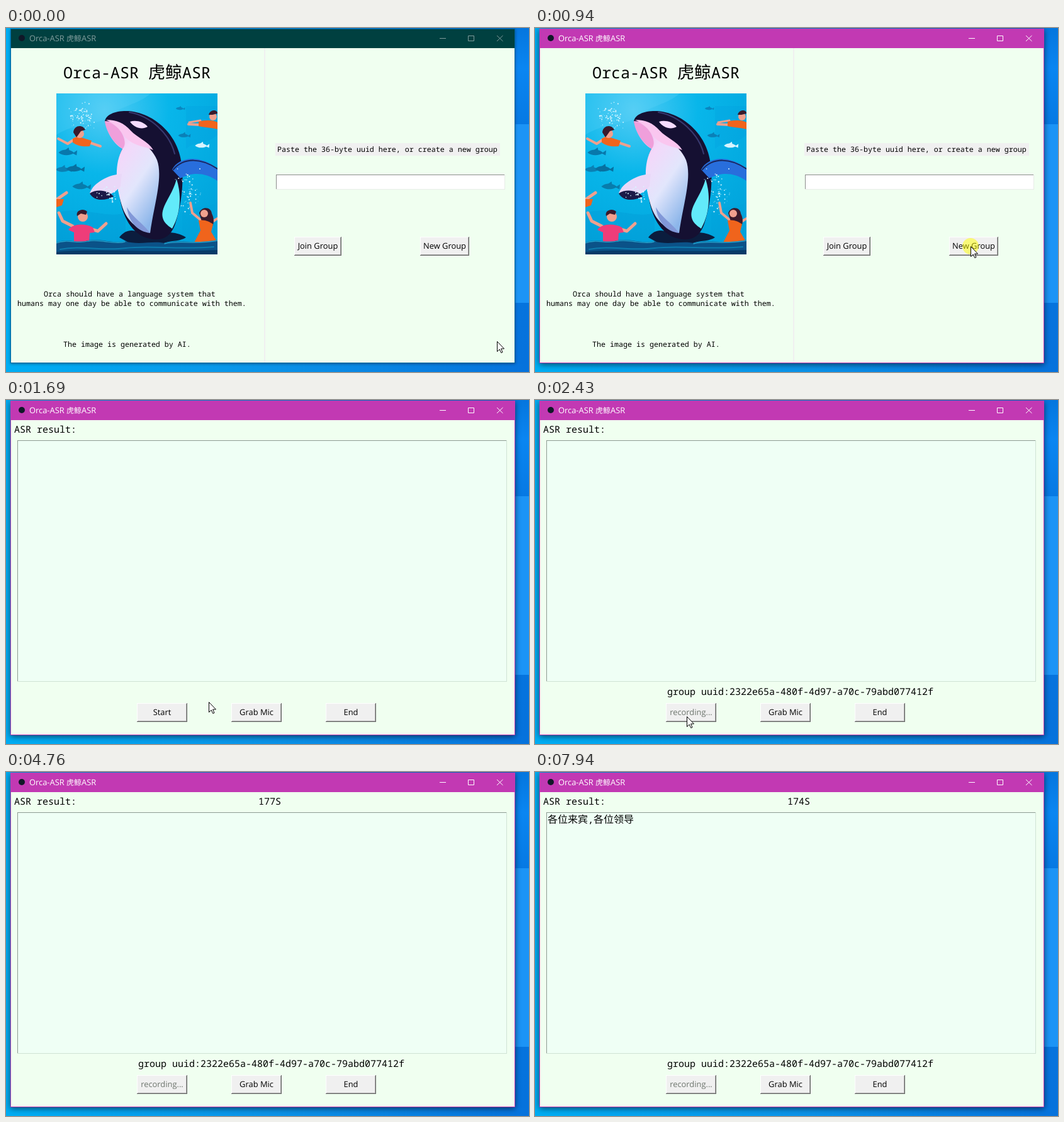
These frames come from a looping animation (831x547 px, 8 s). An HTML page:

```html
<!DOCTYPE html>
<html lang="en">
<head>
<meta charset="utf-8">
<title>Orca-ASR</title>
<style>
  html, body { margin: 0; width: 100%; height: 100%; overflow: hidden; background: #0a84e6; }
  svg { display: block; width: 831px; height: 547px; }
  text { text-rendering: geometricPrecision; white-space: pre; }
  .mono { font-family: "Noto Sans Mono", monospace; font-size: 11.667px; }
  .big { font-size: 15px; }
  .head { font-size: 25px; }
  .ui { font-family: "Open Sans", "Noto Sans", sans-serif; font-size: 12.9px; }
  .mid { text-anchor: middle; }
  .han { font-family: "Noto Sans CJK SC", "Noto Sans CJK", sans-serif; }
  .thin { font-weight: 300; }
</style>
</head>
<body>
<svg id="stage" viewBox="0 0 831 547"></svg>
<script>
const LOOP = 8000;
const stage = document.getElementById('stage');

const rect = (x, y, w, h, fill, extra = '') =>
  `<rect x="${x}" y="${y}" width="${w}" height="${h}" fill="${fill}" ${extra}/>`;
const path = (d, fill) => `<path d="${d}" fill="${fill}"/>`;
const line = (d, color, width) =>
  `<path d="${d}" fill="none" stroke="${color}" stroke-width="${width}" stroke-linecap="round" stroke-linejoin="round"/>`;
const disc = (x, y, r, fill) => `<circle cx="${x}" cy="${y}" r="${r}" fill="${fill}"/>`;
const label = (x, y, cls, str, extra = '') => `<text x="${x}" y="${y}" class="${cls}" ${extra}>${str}</text>`;

// Four nested boxes give the raised bevel.
function button(x, y, w, h, str, id = '') {
  return rect(x, y, w, h, '#696969') + rect(x, y, w - 1, h - 1, '#fff') +
    rect(x + 1, y + 1, w - 2, h - 2, '#a0a0a0') + rect(x + 1, y + 1, w - 3, h - 3, '#f0f0f0') +
    label(x + w / 2, y + 19, 'ui mid', str, id && `id="${id}"`);
}

function sunken(x, y, w, h, fill, dark, light) {
  return rect(x, y, w, h, light) + rect(x, y, w - 1, h - 1, dark) + rect(x + 1, y + 1, w - 2, h - 2, fill);
}

// Small seeded generator for spray and bubbles.
function spray(seed, n, x, y, w, h) {
  const rnd = () => (seed = (seed * 16807) % 2147483647) / 2147483647;
  let out = '';
  for (let i = 0; i < n; i++) {
    const px = x + (rnd() + rnd() - 1) * w, py = y + (rnd() + rnd() - 1) * h;
    out += disc(px.toFixed(1), py.toFixed(1), (0.4 + rnd() * 0.8).toFixed(1), '#d8f6ff');
  }
  return out;
}

const fish = (x, y, s, fill) =>
  `<g transform="translate(${x} ${y}) scale(${s})">` +
  path('M-14 0C-6 -7 6 -6 13 0L19 -4L18 5L12 2C4 6 -7 6 -14 0Z', fill) + path('M-3 -4L4 -9L5 -3Z', fill) + '</g>';

function picture() {
  const skin = '#f0a08e', orange = '#f0641c', hair = '#3a1a2c', ink = '#151032';
  return `<g transform="translate(80 104)" clip-path="url(#frame)">` +
    rect(0, 0, 256, 256, 'url(#sea)') +
    path('M0 0H150C130 18 100 20 82 38C62 52 30 46 0 66Z', '#62d2f540') +
    path('M256 66C236 84 222 74 206 88V20H256Z', '#0095d838') +
    path('M0 190C40 178 80 200 110 190V256H0Z', '#0088c838') +
    path('M200 190C220 176 240 184 256 172V256H200Z', '#00a0d850') +
    fish(16, 94, 0.9, '#0878ac') + fish(10, 121, 0.8, '#0a80b4') + fish(38, 148, 0.9, '#087cac') +
    fish(28, 120, 0.9, '#0870a0') + fish(196, 24, 0.45, '#0a86c0') +
    fish(230, 83, 0.7, '#d8f4ff') + fish(202, 67, 0.6, '#0a80b8') +
    spray(17, 75, 41, 36, 21, 24) +
    // swimmers, upper left and upper right
    line('M33 70L18 80L3 72', skin, 4) + line('M52 78L70 84', skin, 4) +
    path('M26 72C34 66 44 72 56 75L53 84C43 85 34 84 26 78Z', orange) +
    disc(37, 64, 7, skin) + path('M27 62C28 50 42 49 46 58L39 60L32 70Z', hair) +
    line('M229 50L210 49', skin, 4) + line('M229 43L211 46', skin, 3) +
    path('M226 45C236 42 248 42 256 46V57C244 54 234 54 226 52Z', orange) +
    disc(249, 37, 6, skin) + path('M242 34C244 25 256 25 256 32L248 34Z', hair) +
    // orca
    path('M100 229C112 213 128 216 142 228C164 219 190 218 206 229C198 235 184 234 174 237C160 243 142 239 132 243C118 241 110 234 100 229Z', '#0b1d3e') +
    path('M77 45C78 33 95 27 115 28C151 31 184 58 195 94C205 126 200 172 190 204C184 226 170 236 148 231C120 225 104 195 100 160C97 130 96 104 105 88C94 78 82 66 77 45Z', ink) +
    line('M116 30C150 36 180 64 188 96', '#383a70', 2) +
    path('M77 44C88 44 99 47 108 57C120 72 148 77 160 106C170 133 155 178 149 222C127 215 111 202 104 178C94 146 92 112 105 88C92 81 81 64 77 44Z', 'url(#belly)') +
    path('M79 42C96 42 107 47 118 59C128 70 146 76 154 90C140 84 126 84 113 73C104 63 94 48 79 42Z', '#fac6ef') +
    path('M77 45C80 63 92 80 105 88C112 82 108 68 101 59C94 50 86 46 77 45Z', '#ef9fdb') +
    path('M117 45C126 42 139 45 145 53C136 58 124 55 117 45Z', '#f5dcff') +
    path('M112 181C121 197 136 205 149 222C129 220 115 204 112 181Z', '#8298d8') +
    path('M191 136C199 161 198 190 184 215C174 209 166 200 169 187C172 173 185 159 191 136Z', '#62eafa') +
    path('M184 121C194 102 225 96 256 119V139C234 124 214 126 197 135Z', '#286edc') +
    line('M186 121C203 101 231 103 256 120', '#18255a', 2) +
    path('M104 128C82 129 58 143 53 159C68 162 88 167 102 147Z', '#ead8f8') +
    path('M53 159C64 151 84 154 91 164C77 171 60 172 53 159Z', '#1c1a48') +
    spray(61, 38, 86, 157, 22, 16) + spray(29, 55, 213, 156, 25, 40) +
    // swimmers, lower left and lower right
    line('M0 169L16 158', skin, 5) + path('M0 168L12 168L9 178L0 181Z', orange) +
    line('M26 211L10 203L4 190', skin, 5) + line('M56 216L66 219L79 207', skin, 5) +
    path('M19 217C25 207 46 206 58 213L61 221L53 222L52 238H28L28 221Z', '#ee3d79') +
    disc(42, 196, 8, skin) + path('M33 195C30 185 44 182 49 188L47 193L39 191Z', hair) +
    line('M229 201L216 190L213 174', skin, 4) + line('M248 204L256 199', skin, 4) +
    path('M227 190C231 179 246 180 247 191C252 201 250 210 246 213L232 207Z', hair) +
    disc(235, 191, 6, skin) +
    path('M226 202C235 200 244 204 249 208L246 220L256 237H219L229 218Z', orange) +
    // surface
    path('M0 237C18 230 33 239 50 234C70 230 91 240 109 235C132 242 151 234 172 238C196 232 218 240 256 233V256H0Z', '#0b5288') +
    line('M0 238C18 231 33 240 50 235C70 231 91 241 109 236', '#25a4ce', 1.3) +
    line('M172 239C196 233 218 241 256 234', '#25a4ce', 1.3) +
    line('M6 248C40 241 70 251 110 246S190 249 250 244', '#0d7cae', 2) +
    path('M0 252C60 246 140 254 256 249V256H0Z', '#083a68') + '</g>';
}

const home = rect(8, 32, 800, 500, '#f0fff0') + rect(410, 32, 2, 500, '#f0f0f0') +
  label(91, 80, 'mono head', `Orca-ASR <tspan class="han thin" x="226" font-size="27">虎鲸</tspan><tspan x="280">ASR</tspan>`) +
  picture() +
  label(60, 427, 'mono', 'Orca should have a language system that') +
  label(18, 442, 'mono', 'humans may one day be able to communicate with them.') +
  label(91, 507, 'mono', 'The image is generated by AI.') +
  rect(428, 183, 357, 20, '#f0f0f0') +
  label(431, 197, 'mono', 'Paste the 36-byte uuid here, or create a new group') +
  sunken(429, 233, 364, 24, '#fff', '#8c8c8c', '#e8ece8') +
  button(458, 332, 75, 30, 'Join Group') + button(658, 332, 78, 30, 'New Group');

const session = rect(8, 32, 800, 500, '#f0f0f0') + rect(208, 482, 380, 30, '#f0fff0') +
  `<g id="panel">` + rect(8, 32, 800, 500, '#f0fff0') +
  label(13, 52, 'mono big', 'ASR result:') +
  label(401, 52, 'mono big', '', 'id="timer"') +
  sunken(18, 64, 778, 384, '#effff5', '#8d9a92', '#cfe2d4') +
  label(20, 81, 'han', '各位来宾', 'id="part1" font-size="16"') +
  label(84, 81, 'mono big', ',', 'id="comma"') +
  label(93, 81, 'han', '各位领导', 'id="part2" font-size="16"') +
  label(210, 469, 'mono big', 'group uuid:2322e65a-480f-4d97-a70c-79abd077412f', 'id="uuid"') + '</g>' +
  button(208, 482, 80, 30, 'Start', 'start') + button(358, 482, 80, 30, 'Grab Mic') + button(508, 482, 80, 30, 'End');

stage.innerHTML = `<defs>
  <linearGradient id="desk"><stop stop-color="#00adf3"/><stop offset=".5" stop-color="#0b93e8"/><stop offset="1" stop-color="#0672dc"/></linearGradient>
  <linearGradient id="side" x2="0" y2="1"><stop stop-color="#0576de"/><stop offset=".12" stop-color="#0a86f2"/><stop offset=".3" stop-color="#0678e2"/><stop offset="1" stop-color="#0672dc"/></linearGradient>
  <radialGradient id="sea" cx=".3" cy=".1" r="1"><stop stop-color="#52ccf4"/><stop offset=".4" stop-color="#08b6ea"/><stop offset="1" stop-color="#00a2da"/></radialGradient>
  <linearGradient id="belly" x2=".7" y2="1"><stop stop-color="#f2a6e2"/><stop offset=".35" stop-color="#f3d8fa"/><stop offset=".65" stop-color="#e2e6fc"/><stop offset="1" stop-color="#8cb6ea"/></linearGradient>
  <clipPath id="frame"><path d="M0 0H256V256H0Z"/></clipPath>
</defs>` +
  rect(0, 0, 831, 547, 'url(#desk)') + rect(808, 0, 23, 534, 'url(#side)') +
  rect(804, 153, 284, 284, '#1c94f6') +
  rect(7, 1, 802, 532, '#c239b3', 'id="edge"') +
  rect(8, 2, 800, 30, '#c239b3', 'id="bar"') +
  disc(25, 16, 5, '#101828') +
  `<g id="caption">` +
  label(37, 21, 'ui', `Orca-ASR <tspan class="han" font-size="12">虎鲸</tspan>ASR`) +
  `<path d="M689 16.5H699M734.5 12.5H743.5V20.5H734.5ZM780 12L789.5 21M789.5 12L780 21" fill="none" stroke="currentColor"/></g>` +
  `<g id="home">${home}</g><g id="session">${session}</g>` +
  `<circle id="click" r="13" fill="#ff0" opacity=".5"/>` +
  `<path id="arrow" d="M.5 .5V16.5L4.2 13L6.8 18.5L9 17.5L6.6 12H11.5Z" fill="#fff" stroke="#000"/>` +
  `<path id="beam" d="M-3 -7.5H-1L.5 -6.5L2 -7.5H4M.5 -6.5V6.5M-3 7.5H-1L.5 6.5L2 7.5H4" fill="none" stroke="#222"/>`;

const ui = {};
stage.querySelectorAll('[id]').forEach(el => ui[el.id] = el);
const show = (el, on) => el.style.display = on ? '' : 'none';
const last = (rows, t) => rows.filter(row => row[0] <= t).pop();

// time, x, y, shape
const pointer = [
  [0, 780, 498, 'arrow'], [70, 778, 495, 'arrow'], [140, 773, 485, 'arrow'], [220, 763, 466, 'arrow'],
  [290, 748, 440, 'arrow'], [370, 731, 410, 'arrow'], [440, 715, 382, 'arrow'], [520, 702, 361, 'arrow'],
  [590, 693, 348, 'arrow'], [670, 690, 345, 'arrow'], [740, 692, 347, 'arrow'],
  [1010, 694, 348, 'beam'], [1080, 605, 382, 'beam'], [1150, 455, 438, 'beam'], [1220, 355, 467, 'arrow'],
  [1560, 350, 469, 'arrow'], [1640, 322, 480, 'arrow'], [1720, 285, 493, 'arrow'], [1800, 254, 501, 'arrow'],
  [1880, 238, 502, 'arrow'], [1960, 241, 503, 'arrow'], [2500, 242, 504, 'arrow'], [2640, 0, 0, 'none']
];
const timer = [[0, ''], [2700, '179S'], [3700, '178S'], [4760, '177S'], [5690, '176S'], [6680, '175S'], [7740, '174S']];

function render(t) {
  const active = t >= 940, recording = t >= 2430;
  ui.edge.setAttribute('fill', active ? '#c239b3' : '#00659f');
  ui.edge.style.filter = `drop-shadow(0 ${active ? '2px 5px #0009' : '1px 2px #0006'})`;
  ui.bar.setAttribute('fill', active ? '#c239b3' : '#004040');
  ui.caption.style.color = ui.caption.style.fill = active ? '#fff' : '#809c9c';
  show(ui.home, t < 1010);
  show(ui.session, t >= 1010);
  show(ui.panel, t >= 1080);
  show(ui.uuid, recording);
  show(ui.part1, t >= 5360);
  show(ui.comma, t >= 6680);
  show(ui.part2, t >= 7940);
  ui.start.textContent = recording ? 'recording...' : 'Start';
  ui.start.setAttribute('fill', recording ? '#6d756d' : '#000');
  ui.timer.textContent = last(timer, t)[1];

  const [, x, y, shape] = last(pointer, t);
  for (const name of ['arrow', 'beam', 'click']) ui[name].setAttribute('transform', `translate(${x} ${y})`);
  show(ui.arrow, shape === 'arrow');
  show(ui.beam, shape === 'beam');
  show(ui.click, (t >= 940 && t < 1010) || (t >= 2360 && t < 2430));
}

const begin = performance.now();
function tick() {
  render((performance.now() - begin) % LOOP);
  requestAnimationFrame(tick);
}
tick();
</script>
</body>
</html>
```
